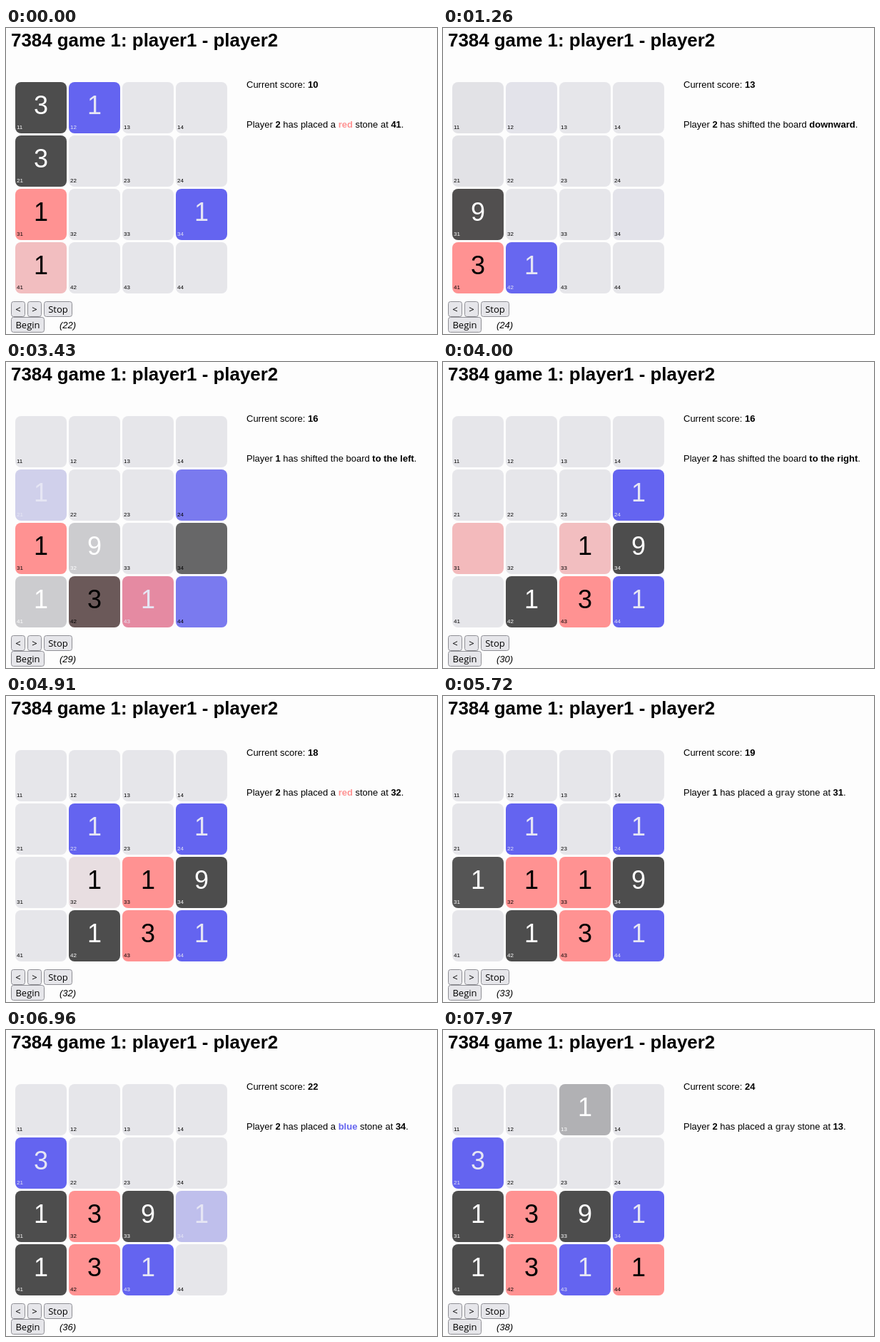
An HTML page for the animation above (8000 ms loop, 604 by 430 pixels).

```html
<!DOCTYPE html>
<html lang="en">
<head>
<meta charset="utf-8">
<style>
  html, body { margin: 0; width: 100%; height: 100%; overflow: hidden; background: #fdfdfd; }
  svg { display: block; font: 13px "Liberation Sans", Arial, sans-serif; }
  .title { font-size: 25.9px; font-weight: bold; }
  .value { font-size: 36px; text-anchor: middle; }
  .label { font-size: 8px; }
  .button rect { fill: #e6e6ea; stroke: #8e8e94; }
  .button text { font-family: "Open Sans", "Noto Sans", sans-serif; text-anchor: middle; }
  .bold { font-weight: bold; }
  .count { font-style: italic; }
</style>
</head>
<body>
<svg width="604" height="430" viewBox="0 0 604 430">
  <text class="title" x="7" y="26">7384 game 1: player1 - player2</text>
  <g id="board"></g>
  <g id="info"></g>
  <g id="buttons"></g>
</svg>
<script>
const LOOP = 8000, STEP = 500, FADE = 500, LEAD = 140, FIRST_MOVE = 22;
const EMPTY = [230, 230, 234];
const STONES = {
  red: { fill: [255, 146, 146], ink: '#000' },
  blue: { fill: [100, 100, 240], ink: '#e6e6f4' },
  gray: { fill: [77, 77, 77], ink: '#fff' }
};
const MOVES = ['red 41', 'gray 24', 'downward', 'to the right', 'blue 24', 'red 31',
  'gray 42', 'to the left', 'to the right', 'blue 22', 'red 32', 'gray 31',
  'to the right', 'to the left', 'blue 34', 'red 44', 'gray 13'];

const cellIndex = label => (label[0] - 1) * 4 + (label[1] - 1);
const stone = (color, value) => ({ color, value });
const fillOf = s => s ? STONES[s.color].fill : EMPTY;
const rgb = c => `rgb(${c.map(Math.round)})`;
const byId = id => document.getElementById(id);

function place(board, move) {
  const [color, label] = move.split(' ');
  const next = board.slice();
  next[cellIndex(label)] = stone(color, 1);
  return next;
}

// Equal values meet: one colour triples, two colours cancel out.
function squeeze(line) {
  const out = [];
  let open = false;
  for (const s of line.filter(Boolean)) {
    const last = out[out.length - 1];
    if (open && last.value === s.value) {
      out.pop();
      if (last.color === s.color) out.push(stone(s.color, s.value * 3));
      open = false;
    } else {
      out.push(s);
      open = true;
    }
  }
  return out;
}

function shift(board, direction) {
  const next = Array(16).fill(null);
  for (let i = 0; i < 4; i++) {
    const cells = [0, 1, 2, 3].map(j => direction === 'downward' ? j * 4 + i : i * 4 + j);
    if (direction !== 'to the left') cells.reverse();
    squeeze(cells.map(c => board[c])).forEach((s, j) => next[cells[j]] = s);
  }
  return next;
}

const start = Array(16).fill(null);
[['11', 'gray', 3], ['12', 'blue', 1], ['21', 'gray', 3], ['31', 'red', 1], ['34', 'blue', 1]]
  .forEach(([label, color, value]) => start[cellIndex(label)] = stone(color, value));
const boards = [start];
MOVES.forEach((move, n) =>
  boards.push(/\d/.test(move) ? place(boards[n], move) : shift(boards[n], move)));

// A colour change undone by the very next move snaps back instead of fading.
const snaps = [];
MOVES.forEach((_, n) => snaps.push(start.map((_, i) => {
  if (!n || snaps[n - 1][i]) return false;
  const [older, old, now] = boards.slice(n - 1, n + 2).map(b => fillOf(b[i]));
  return now === older && now !== old;
})));

// The CSS "ease" curve, solved by bisection.
function ease(x) {
  if (x >= 1) return 1;
  const bezier = (a, b, u) => 3 * a * u * (1 - u) ** 2 + 3 * b * u * u * (1 - u) + u ** 3;
  let low = 0, high = 1;
  for (let i = 0; i < 24; i++) {
    const mid = (low + high) / 2;
    if (bezier(.25, .25, mid) < x) low = mid; else high = mid;
  }
  return bezier(.1, 1, low);
}

function drawCell(i, before, now, progress) {
  const row = i >> 2, col = i % 4, x = 13 + col * 75, y = 76 + row * 75;
  const from = fillOf(before), to = fillOf(now);
  const fill = rgb(from.map((c, k) => c + (to[k] - c) * progress));
  const ink = now ? STONES[now.color].ink : '#000';
  return `<rect x="${x}" y="${y}" width="72" height="72" rx="8" fill="${fill}"/>
    <text class="label" x="${x + 2}" y="${y + 66}" fill="${ink}">${row + 1}${col + 1}</text>` +
    (now ? `<text class="value" x="${x + 36}" y="${y + 45}" fill="${ink}">${now.value}</text>` : '');
}

const bold = (text, fill = '#000') => `<tspan class="bold" fill="${fill}">${text}</tspan>`;

function describe(move) {
  const [color, label] = move.split(' ');
  return STONES[color]
    ? `has placed a ${bold(color, rgb(STONES[color].fill))} stone at ${bold(label)}.`
    : `has shifted the board ${bold(move)}.`;
}

function draw(t) {
  const clock = t + LEAD, n = Math.floor(clock / STEP);
  const progress = ease((clock - n * STEP) / FADE);
  const before = boards[n], now = boards[n + 1];
  const score = now.reduce((sum, s) => sum + (s ? s.value : 0), 0);
  byId('board').innerHTML = now.map((s, i) =>
    drawCell(i, before[i], s, snaps[n][i] ? 1 : progress)).join('');
  byId('info').innerHTML =
    `<text x="337" y="84">Current score: ${bold(score)}</text>
     <text x="337" y="140">Player ${bold(n % 2 ? 1 : 2)} ${describe(MOVES[n])}</text>
     <text class="count" x="75" y="422">(${FIRST_MOVE + n})</text>`;
}

byId('buttons').innerHTML = [
  ['&lt;', 7, 384, 20], ['&gt;', 30, 384, 20], ['Stop', 53, 384, 40], ['Begin', 7, 406, 47]
].map(([text, x, y, w]) => `<g class="button">
  <rect x="${x + .5}" y="${y + .5}" width="${w - 1}" height="21" rx="3"/>
  <text x="${x + w / 2}" y="${y + 16}">${text}</text></g>`).join('');

const began = performance.now();
function tick() {
  draw((performance.now() - began) % LOOP);
  requestAnimationFrame(tick);
}
tick();
</script>
</body>
</html>
```
